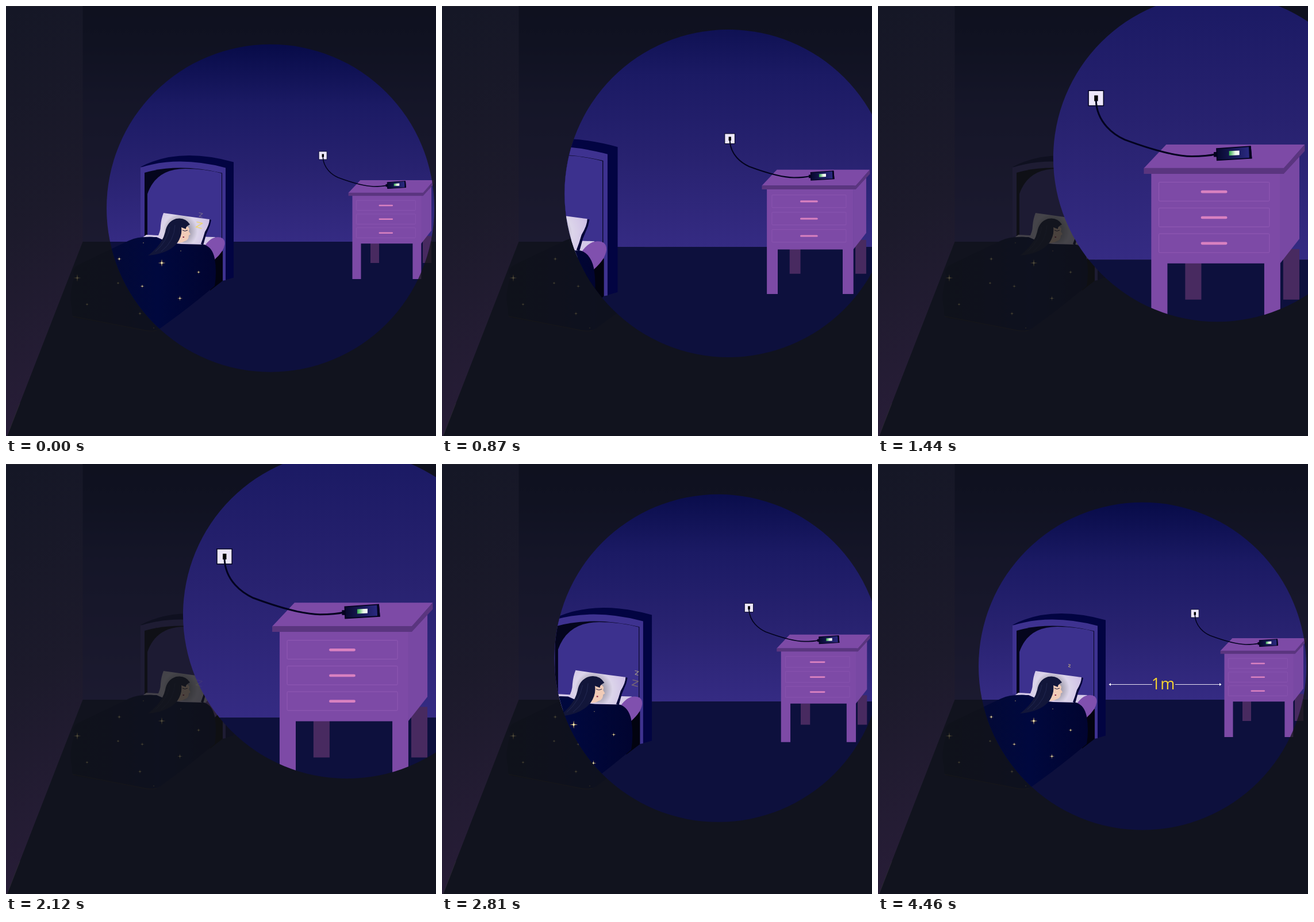
These frames come from a looping animation (748 px wide and 748 px high, 4530 ms). An HTML page:

```html
<!DOCTYPE html>
<html lang="en">
<head>
<meta charset="utf-8">
<title>Sleeping one metre from the phone</title>
<style>
  html, body { margin: 0; height: 100%; overflow: hidden; background: #11141f; }
  svg { display: block; width: 100%; height: 100%; }
  .label { font: 27px "Open Sans", "Noto Sans", sans-serif; fill: #f7d52f; }
  .zed { fill: none; stroke: #f5d83a; stroke-linejoin: round; }
</style>
</head>
<body>
<svg viewBox="0 0 748 748">
  <defs>
    <linearGradient id="wall" gradientUnits="userSpaceOnUse" x1="0" y1="0" x2="0" y2="410">
      <stop offset="0" stop-color="#02063f"/>
      <stop offset=".16" stop-color="#070b48"/>
      <stop offset=".42" stop-color="#1b1a64"/>
      <stop offset=".7" stop-color="#282270"/>
      <stop offset="1" stop-color="#352b83"/>
    </linearGradient>
    <linearGradient id="sideWall" x1=".2" y1="0" x2=".3" y2="1">
      <stop offset="0" stop-color="#151726"/>
      <stop offset=".5" stop-color="#1c1a2b"/>
      <stop offset="1" stop-color="#281d38"/>
    </linearGradient>
    <radialGradient id="pillow" gradientUnits="userSpaceOnUse" cx="303" cy="391" r="52">
      <stop offset=".3" stop-color="#a39fae"/>
      <stop offset=".58" stop-color="#dcd5ea"/>
      <stop offset="1" stop-color="#cfc0e6"/>
    </radialGradient>
    <linearGradient id="blanket" x1="0" y1="0" x2="1" y2="0">
      <stop offset="0" stop-color="#050a2e"/>
      <stop offset=".6" stop-color="#00083e"/>
      <stop offset="1" stop-color="#010430"/>
    </linearGradient>
    <linearGradient id="screen">
      <stop offset="0" stop-color="#06082c"/>
      <stop offset="1" stop-color="#2c2b86"/>
    </linearGradient>
    <linearGradient id="charge">
      <stop offset="0" stop-color="#2fa84a"/>
      <stop offset=".6" stop-color="#e8f5e6"/>
      <stop offset="1" stop-color="#fff"/>
    </linearGradient>
    <clipPath id="spot"><circle id="spotCircle" r="285"/></clipPath>
    <clipPath id="wipe"><rect id="wipeRect" y="360" width="400" height="50"/></clipPath>

    <g id="room">
      <path fill="url(#wall)" d="M0 0H748V410H0Z"/>
      <path fill="#0d103d" d="M0 410H748V748H0Z"/>

      <!-- bed -->
      <path fill="#020442" d="M234 280Q300 245 396 271.500V472.500L377 478V300Z"/>
      <path fill="#3e3290" d="M234 281Q300 260 382 281.500V477L376 478V400H234Z"/>
      <path fill="#04051d" d="M241 290Q300 273 376 290.500V420H241Z"/>
      <path fill="#3c318e" d="M246 420V327Q261 283 312 283Q345 283 375 291V420Z"/>
      <path fill="#020310" d="M350 430L377 426V478L355 495Z"/>
      <path fill="#d5c9e8" d="M236 404L244 398L264 399L364 402L352 424H240Z"/>
      <path fill="#8050ae" d="M345 418Q356 402 368 402Q381 402 380.500 414Q379 427 363 441Z"/>
      <path fill="#020338" d="M347 370L357 372L355 381L348 398L343 416L337 413Z"/>
      <path fill="url(#pillow)" d="M274 360Q315 366 354 371Q354 380 346 393Q343 404 339 414Q300 412 262 405Q269 393 269 382Q270 370 274 360Z"/>

      <path fill="url(#blanket)" d="M214 408Q231 400 262 402Q285 413 305 414L345 415Q359 420 363 439Q367 463 363 487Q335 511 302 536L272 558Q259 569 236 563L122 543Q113 541 115 529Q108 503 119 470Q113 461 122 452Q165 431 214 408Z"/>
      <path fill="none" stroke="#3a2c22" stroke-width="1" opacity=".6" d="M116 540L236 563Q252 567 262 564"/>
      <g id="stars"></g>

      <!-- sleeper -->
      <path fill="#f1cbb7" d="M304 383Q317 381 319 388L318 392L321 397L318 399Q318 407 311 409Q305 413 298 412Z"/>
      <path fill="#12163a" d="M320 380Q312 367 296 370Q280 375 277 393Q272 415 247 434Q283 431 298 412Q307 399 305 385L313 388Q312 384 320 380Z"/>
      <path fill="none" stroke="#252b55" stroke-width=".8" d="M285 384Q281 409 260 427M294 381Q293 409 270 427"/>
      <path fill="none" stroke="#1b1838" d="M307 390Q311 393 316 390"/>
      <path fill="none" stroke="#8b2946" stroke-width="2" d="M307.500 402H310"/>

      <!-- bedside table -->
      <path fill="#482a60" d="M634 413H649V447H634ZM725 400H740V447H725Z"/>
      <path fill="#7848a3" d="M722 326L740 310V390.600L722 413.500Z"/>
      <path fill="#7d4aa6" d="M602.500 328H722.300V475H707.400V413.300H617.500V475H602.500Z"/>
      <path fill="#7d4aa6" d="M616.400 303H745L725.500 325H595.600Z"/>
      <path fill="#5a357f" d="M595.600 324.800H725.500L745 303V309L725.500 330.200H595.600Z"/>
      <g id="drawers"></g>

      <!-- charger and phone -->
      <path fill="#ece6fa" stroke="#02031f" stroke-width=".8" d="M544.200 253h14v14h-14z"/>
      <path d="M549.600 257.400h3.400v5.400h-3.400z"/>
      <path fill="none" stroke="#02031f" stroke-width="1.600" d="M551.200 262C552 283 568 294 578 298.600Q618 313.500 640 314Q654 314 662.500 312"/>
      <path fill="#02031f" d="M660.500 310h3.500v4.500h-3.500z"/>
      <path fill="url(#screen)" stroke="#02031f" d="M663.200 306.800L694.500 304.700L695.400 315.600L663.600 317.600Z"/>
      <path fill="#02031f" d="M693 304.500H695L696 316H693.500Z"/>
      <path fill="url(#charge)" d="M674.700 309L684.300 308.600V312.800L674.700 313.300Z"/>
    </g>
  </defs>

  <use href="#room"/>
  <path fill="#131515" fill-opacity=".75" d="M0 0H748V748H0Z"/>
  <path fill="url(#sideWall)" d="M0 0H133.500V410L2 748H0Z"/>
  <path fill="none" stroke="#2b2a33" stroke-width=".8" d="M0 .4H133M24 691L2 748"/>

  <g clip-path="url(#spot)"><use id="lit" href="#room"/></g>

  <path class="zed" stroke-width="1.600" d="M331.500 375.500L341.500 378L330.500 384.500L340.500 387"/>
  <path class="zed" stroke-width="1.100" style="stroke:#a79c86" d="M335.500 359.500L342 361L336 366L341.500 367.500"/>
  <path class="zed" stroke-width=".9" style="stroke:#c9b27c" d="M331 348.500L335 349.500L331 352.500L335 353.500"/>

  <g clip-path="url(#wipe)">
    <text class="label" x="496" y="391.500" text-anchor="middle">1m</text>
    <path fill="none" stroke="#e6e1f2" d="M404 383.500H477M517 383.500H596"/>
    <path fill="#fff" d="M401.500 383.500l3.500-2.500v5zM597.500 383.500l-3.500-2.500v5z"/>
  </g>
</svg>

<script>
const LOOP = 4530;
const byId = id => document.getElementById(id);
const clamp = v => Math.min(1, Math.max(0, v));
const ramp = (t, from, to) => clamp((t - from) / (to - from));
const smooth = (t, from, length) => {
  const u = ramp(t, from, from + length);
  return u * u * (3 - 2 * u);
};

// x, y, radius of the stars on the blanket
const stars = [
  [197, 440, 4], [124, 473, 6.5], [195, 482, 3], [237, 487.5, 3.5],
  [271, 447, 6.5], [141, 519, 3], [233, 535, 3.5], [302.5, 508.5, 4.5],
  [335, 463, 3.5], [257, 560, 1.3], [304, 426, 1.3], [239, 412, 1.3]
];
byId("stars").innerHTML = stars.map(([x, y, r]) => {
  const k = r * 0.13;
  return `<path fill="#e3c56f" d="M${x} ${y - r}l${k} ${r - k}l${r - k} ${k}l${k - r} ${k}l${-k} ${r - k}` +
    `l${-k} ${k - r}l${k - r} ${-k}l${r - k} ${-k}z"/><circle cx="${x}" cy="${y}" r="${r * 0.23}" fill="#fff3c8"/>`;
}).join("");

byId("drawers").innerHTML = [0, 1, 2].map(i => {
  const y = 338 + i * 23.9;
  return `<rect x="609.5" y="${y}" width="102.700" height="17.500" rx=".8" fill="none" stroke="#935cb6" stroke-width=".5"/>
    <path d="M649.800 ${y + 8.9}H671.800" stroke="#d981c0" stroke-width="2.500" stroke-linecap="round"/>`;
}).join("");

// One snore: the letters fade in and out one after another.
const fades = [[0, 350, 550, 780], [540, 720, 750, 900], [750, 900, 1350, 1490]];
const snores = [-630, 2100, 3500];
const zeds = document.querySelectorAll(".zed");

function draw(t) {
  const closing = t < 2120;
  const zoom = closing ? smooth(t, 498, 1061) : 1 - smooth(t, 2002, 1002);
  const pan = closing ? smooth(t, 498, 1061) : 1 - smooth(t, 2058, 1000);

  const scale = 1 + 0.905 * zoom;
  byId("lit").setAttribute("transform", `translate(748 374) scale(${scale}) translate(-748 -374)`);
  byId("spotCircle").setAttribute("cx", 460 + 134.5 * pan);
  byId("spotCircle").setAttribute("cy", 351.7 - 90.5 * pan);

  zeds.forEach((zed, i) => {
    const [a, b, c, d] = fades[i];
    zed.style.opacity = Math.max(...snores.map(s => ramp(t - s, a, b) * (1 - ramp(t - s, c, d))));
  });

  byId("wipeRect").setAttribute("x", t < 2900 ? 748 : 553 - (t - 3200) * 0.188);
}

function tick(now) {
  draw(now % LOOP);
  requestAnimationFrame(tick);
}
draw(0);
requestAnimationFrame(tick);
</script>
</body>
</html>
```
